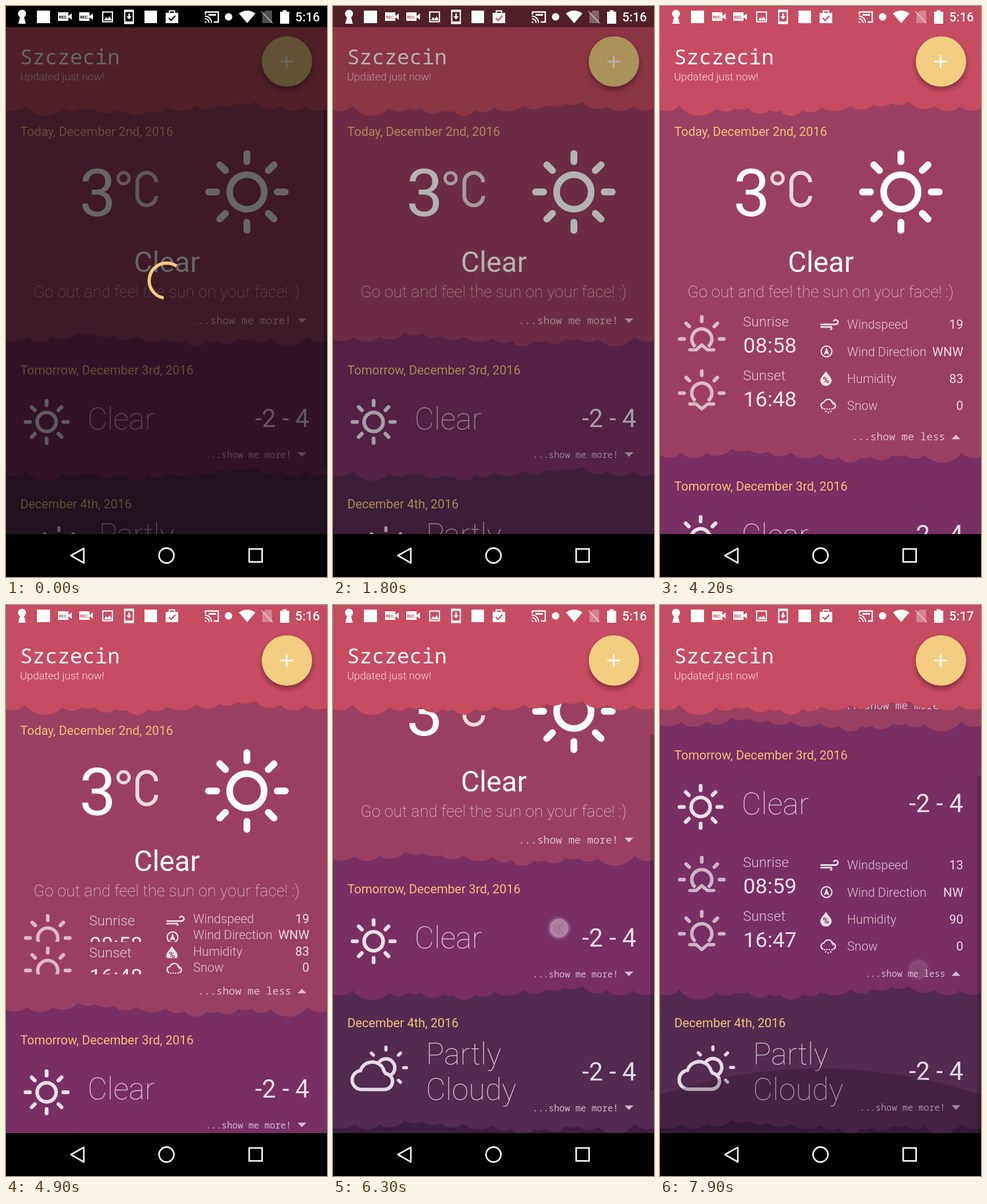
Recreate the animation shown at these times as an HTML page with a canvas. Size 561 by 998 pixels, loop 8000 ms.

```html
<!DOCTYPE html>
<html lang="en">
<head>
<meta charset="utf-8">
<title>Weather</title>
<style>
html, body { margin: 0; width: 100%; height: 100%; overflow: hidden; background: #000; }
canvas { display: block; width: 561px; height: 998px; }
</style>
</head>
<body>
<canvas id="c" width="561" height="998"></canvas>
<script>
const W = 561, H = 998, LOOP = 8000, BOTTOM = 923, TAU = Math.PI * 2;
const g = document.getElementById('c').getContext('2d');
const SANS = 'Roboto, sans-serif', MONO = '"Noto Sans Mono", monospace';
const HEADER = '#c64c62', GOLD = '#f0c07c';

const clamp = (v, a = 0, b = 1) => Math.min(b, Math.max(a, v));
const ramp = (t, a, b) => clamp((t - a) / (b - a));
const mix = (a, b, k) => a + (b - a) * k;
const sine = u => (1 - Math.cos(Math.PI * u)) / 2;
const out = u => 1 - (1 - u) ** 2;
const white = a => `rgba(255,255,255,${a})`;

// ---------- drawing helpers ----------
function text(s, x, y, size, color, weight = 400, align = 'left', font = SANS) {
  g.font = `${weight} ${size}px ${font}`;
  g.fillStyle = color;
  g.textAlign = align;
  g.fillText(s, x, y);
}
function line(color, width, pts, close) {
  g.beginPath();
  pts.forEach(([x, y]) => g.lineTo(x, y));
  if (close) g.closePath();
  g.strokeStyle = color;
  g.lineWidth = width;
  g.stroke();
}
function poly(color, pts) {
  g.beginPath();
  pts.forEach(([x, y]) => g.lineTo(x, y));
  g.fillStyle = color;
  g.fill();
}
function disc(x, y, r, color) {
  g.beginPath();
  g.arc(x, y, r, 0, TAU);
  g.fillStyle = color;
  g.fill();
}
function ring(x, y, r, width, color, a = 0, b = TAU) {
  g.beginPath();
  g.arc(x, y, r, a, b);
  g.lineWidth = width;
  g.strokeStyle = color;
  g.stroke();
}
function box(x, y, w, h, color) {
  g.fillStyle = color;
  g.fillRect(x, y, w, h);
}
function clipped(x, y, w, h, draw) {
  g.save();
  g.beginPath();
  g.rect(x, y, w, h);
  g.clip();
  draw();
  g.restore();
}
function rays(x, y, from, to, width, color, list) {
  g.lineCap = 'round';
  for (const k of list) {
    const c = Math.cos(k * TAU / 8), s = Math.sin(k * TAU / 8);
    line(color, width, [[x + c * from, y + s * from], [x + c * to, y + s * to]]);
  }
  g.lineCap = 'butt';
}

// bumps along a panel's lower edge: x, depth, radius
const BUMPS = [[12, 17, 30], [68, 25, 42], [115, 18, 26], [143, 14, 27], [175, 21, 27],
  [202, 18, 20], [229, 25, 24], [262, 19, 26], [305, 17, 46], [352, 14, 30],
  [386, 9, 32], [418, 6, 32], [462, 13, 34], [502, 17, 32], [546, 16, 36]];

function panel(base, color, flip) {
  if (base > 0) box(0, 0, W, base, color);
  for (const [x, d, r] of BUMPS) disc(flip ? W - x : x, base + d - r, r, color);
}

// ---------- weather icons ----------
function sun(x, y, k, color) {
  ring(x, y, 30.2 * k, 11.5 * k, color);
  rays(x, y, 53 * k, 67 * k, 12 * k, color, [0, 1, 2, 3, 4, 5, 6, 7]);
}
function horizonSun(x, y, dir) {
  const c = white(.64), b = y + 19;
  ring(x, y, 17.5, 6, c, Math.PI * .72, Math.PI * 2.28);
  rays(x, y, 31, 38.5, 6.4, c, [4, 5, 6, 7, 8]);
  g.lineCap = g.lineJoin = 'round';
  line(c, 5.6, [[x - 21, b], [x - 10, b], [x, b + 8.5 * dir], [x + 10, b], [x + 21, b]]);
  g.lineCap = 'butt';
  g.lineJoin = 'miter';
}
function cloudySun(y, fill) {
  const c = '#e6dbe4';
  ring(92.5, y + 78, 15.5, 6, c);
  rays(92.5, y + 78, 31, 36, 5.6, c, [0, 1, 5, 6, 7]);
  g.beginPath();
  g.arc(50, y + 99.5, 16.5, Math.PI * .5, Math.PI * 1.46);
  g.arc(68.5, y + 89.5, 21.5, Math.PI * 1.12, Math.PI * 1.92);
  g.arc(90, y + 102, 14, Math.PI * 1.55, Math.PI * 2.5);
  g.closePath();
  g.fillStyle = fill;
  g.fill();
  g.strokeStyle = c;
  g.lineWidth = 6;
  g.stroke();
}
const rowIcons = [
  y => {
    const c = white(.85);
    g.lineCap = 'round';
    line(c, 2.8, [[281.5, y], [306, y]]);
    ring(307, y - 4, 4, 2.6, c, -Math.PI * .8, Math.PI * .5);
    line(c, 2.8, [[281.5, y + 4.5], [298, y + 4.5]]);
    ring(298, y + 6.5, 2.2, 2.4, c, -Math.PI * .5, Math.PI * .5);
    g.lineCap = 'butt';
  },
  y => {
    ring(291, y, 9.4, 2.2, white(.85));
    poly(white(.85), [[291, y - 7], [296, y + 6], [291, y + 3.5], [286, y + 6]]);
  },
  (y, fill) => {
    g.beginPath();
    g.moveTo(290, y - 13);
    g.bezierCurveTo(293, y - 7, 300, y - 2, 300, y + 4);
    g.arc(290, y + 3, 10, .1, Math.PI - .1);
    g.bezierCurveTo(280, y - 2, 287, y - 7, 290, y - 13);
    g.fillStyle = white(.85);
    g.fill();
    text('%', 290, y + 8, 15, fill, 700, 'center');
  },
  y => {
    const c = white(.85);
    g.beginPath();
    g.arc(287, y, 5.5, Math.PI * .6, Math.PI * 1.5);
    g.arc(294, y - 3, 8, Math.PI * 1.1, Math.PI * 1.95);
    g.arc(301, y, 5.5, Math.PI * 1.5, Math.PI * 2.4);
    g.strokeStyle = c;
    g.lineWidth = 2.4;
    g.stroke();
    for (let i = 0; i < 7; i++) disc(287.5 + i * 2.2, y + 6 + (i % 2) * 4 + (i === 3 ? 2 : 0), 1.3, c);
  }
];

// ---------- day panels ----------
const ROW = 47.3;
const names = ['Windspeed', 'Wind Direction', 'Humidity', 'Snow'];

function details(top, p, day) {
  // rows shorter than their contents show them from the top
  const h = ROW * p, icon = (Math.max(h, 39) - ROW) / 2, label = (Math.max(h, 30) - ROW) / 2;
  ['Sunrise', 'Sunset'].forEach((name, i) => {
    const y = top + i * 2 * h;
    clipped(0, y, 275, 2 * h, () => {
      horizonSun(73, y + 50, i ? 1 : -1);
      text(name, 145, y + 27.6, 24.5, white(.72), 300);
      text(day.sun[i], 145.6, y + 73.7, 37.4, white(.86));
    });
  });
  names.forEach((name, i) => {
    const y = top + i * h;
    clipped(275, y, 286, h, () => {
      rowIcons[i](y + 24.5 + icon, day.color);
      text(name, 327, y + 32.4 + label, 21.8, white(.72), 300);
      text(day.data[i], 530, y + 32.4 + label, 21.8, white(.82), 400, 'right');
    });
  });
}
function more(y, open, size) {
  text(open ? '...show me less' : '...show me more!', 498.5, y + 6, size, white(.68), 400, 'right', MONO);
  const d = open ? -4 : 4;
  poly(white(.68), [[509.5, y - d], [525, y - d], [517.2, y + d]]);
}
function todayBody(y) {
  text('3', 128, y + 148, 115, '#fff');
  ring(205.5, y + 82, 9.8, 5.4, white(.8));
  g.beginPath();
  g.arc(246, y + 89, 16.5, 0, Math.PI, true);
  g.arc(246, y + 113, 16.5, Math.PI, 0, true);
  g.strokeStyle = white(.8);
  g.lineWidth = 6.6;
  g.stroke();
  sun(421, y + 106, 1, '#fff');
  text('Clear', 281, y + 246, 49.9, '#fff', 400, 'center');
  text('Go out and feel the sun on your face! :)', 280.5, y + 290, 28.3, white(.78), 100, 'center');
}
function range(y) {
  text('-2 - 4', 530, y + 100, 43.6, white(.85), 400, 'right');
}
const days = [
  { title: 'Today, December 2nd, 2016', color: '#9b3f62', base: 351, moreY: 331, size: 18.2,
    top: 313, extra: 14, curve: .45, sun: ['08:58', '16:48'], data: ['19', 'WNW', '83', '0'],
    next: 417, body: todayBody },
  { title: 'Tomorrow, December 3rd, 2016', color: '#782f61', base: 169, moreY: 148, size: 15.6,
    top: 168, extra: 45, curve: .62, sun: ['08:59', '16:47'], data: ['13', 'NW', '90', '0'],
    next: 234, body: y => {
      sun(71, y + 91, .55, white(.85));
      text('Clear', 142.5, y + 103.6, 53, white(.76), 100);
      range(y);
    } },
  { title: 'December 4th, 2016', color: '#552a4f', base: 169, moreY: 148, size: 15.6,
    next: 234, body: y => {
      cloudySun(y, '#552a4f');
      text('Partly', 162.5, y + 72.4, 53, white(.74), 100);
      text('Cloudy', 162.5, y + 134.5, 53, white(.74), 100);
      range(y);
    } }
];

function content(scroll, opens) {
  let y = 219 - scroll;
  const spots = days.map((day, i) => {
    const p = opens[i];
    const grow = p ? 4 * ROW * p + day.extra * p ** day.curve : 0;
    const spot = { day, p, y, grow, i };
    y += day.next + grow;
    return spot;
  });
  box(0, 0, W, BOTTOM, '#3c1e3e');
  for (const { day, p, y, grow, i } of spots.reverse()) {
    panel(y + day.base + grow, day.color, i % 2 === 0);
    text(day.title, 25, y + 7.5, 21.8, GOLD);
    day.body(y);
    if (p) details(y + day.top, p, day);
    more(y + day.moreY + grow, p > 0, day.size);
  }
}

function header() {
  panel(167, HEADER, false);
  text('Szczecin', 24.5, 102, 36.4, '#fff', 400, 'left', MONO);
  text('Updated just now!', 24.5, 130, 18.7, white(.8), 300);
  g.save();
  g.shadowColor = 'rgba(60,10,30,.5)';
  g.shadowBlur = 10;
  g.shadowOffsetY = 5;
  disc(491, 97, 44, '#f3ce80');
  g.restore();
  box(479.5, 95.5, 22, 3, '#fff');
  box(489, 86, 3, 22, '#fff');
}

// ---------- system bars ----------
function statusBar(clock, bg) {
  const w = '#fff';
  disc(28, 13.5, 7, w);
  poly(w, [[25.5, 15], [30.5, 15], [34.5, 31], [21.5, 31]]);
  box(54, 8, 23, 22, w);
  for (const x of [91, 128]) {
    box(x, 11, 18, 15, w);
    poly(w, [[x + 16, 18.5], [x + 24, 13], [x + 24, 24]]);
    text('REC.', x + 9, 21.5, 7, bg, 700, 'center');
  }
  g.strokeStyle = w;
  g.lineWidth = 2.2;
  g.strokeRect(169, 10.5, 17, 17);
  poly(w, [[171, 25], [175, 19.5], [178, 22.5], [181, 18], [185, 25]]);
  g.strokeRect(207.5, 7.5, 15, 23);
  box(207, 7, 16, 3.5, w);
  box(207, 27, 16, 4, w);
  box(213.8, 13, 2.6, 6, w);
  poly(w, [[210.5, 18], [219.5, 18], [215, 23.5]]);
  box(242, 8, 22, 22, w);
  box(279, 12, 22, 18, w);
  g.strokeStyle = w;
  g.strokeRect(285.5, 8.5, 9, 5);
  line(bg, 2.4, [[284.5, 21], [288.5, 25], [296, 17]]);

  line(w, 2.4, [[348.5, 15], [348.5, 10.5], [371, 10.5], [371, 28], [363, 28]]);
  poly(w, [[347.5, 25.5], [351, 29.5], [347.5, 29.5]]);
  ring(347.5, 29.5, 7.5, 2.2, w, -Math.PI / 2, 0);
  ring(347.5, 29.5, 11.8, 2.2, w, -Math.PI / 2, 0);
  box(354, 14, 13, 3, w);
  disc(389, 19, 6.5, w);
  g.beginPath();
  g.moveTo(421.5, 30);
  g.lineTo(407, 13);
  g.quadraticCurveTo(421.5, 3, 436, 13);
  g.fillStyle = w;
  g.fill();
  poly(white(.3), [[454, 8], [465, 8], [465, 30], [448, 30], [448, 14]]);
  line(white(.45), 2.2, [[446, 9], [466, 30]]);
  box(479, 10, 16, 21, w);
  box(483.5, 7.5, 7, 3, w);
  text(clock, 548.5, 27, 21.8, w, 500, 'right');
}
function navBar() {
  const w = '#f4f4f4';
  box(0, BOTTOM, W, H - BOTTOM, '#000');
  g.lineJoin = 'round';
  line(w, 2.8, [[113.5, 960.5], [136, 948], [136, 973.5]], true);
  g.lineJoin = 'miter';
  ring(280.5, 960.5, 13, 2.8, w);
  g.strokeRect(425, 949, 22.6, 22.6);
}

// ---------- overlays ----------
const sweep = u => { const v = u ** .58; return v * v * (3 - 2 * v); };

function spinner(t, alpha) {
  const c = ((t + 313) % 1332) / 1332;
  const tail = .75 * sweep(ramp(c, .5, 1));
  const head = .75 * sweep(ramp(c, 0, .5)) + .03;
  const spin = .25 * (c - .235) + t / 2222 + .278;
  g.globalAlpha = alpha;
  ring(281, 480, 30.8, 5.6, '#f8cc7d', (tail + spin) * TAU, (head + spin) * TAU);
  g.globalAlpha = 1;
}
function touch(x, y, alpha) {
  if (alpha <= 0) return;
  const r = 22, f = g.createRadialGradient(x, y, 0, x, y, r);
  f.addColorStop(0, 'rgba(206,170,196,.85)');
  f.addColorStop(.55, 'rgba(214,184,206,.87)');
  f.addColorStop(.7, 'rgba(228,206,222,.85)');
  f.addColorStop(.77, white(.28));
  f.addColorStop(1, white(0));
  g.globalAlpha = alpha;
  disc(x, y, r, f);
  g.globalAlpha = 1;
}
const press = (t, a, b) => t < a ? 0 : 1 - ramp(t, b, b + 145);

function draw(t) {
  const drag = out(ramp(t, 5810, 6340)), fling = sine(ramp(t, 7450, 7830));
  const scroll = 140 * drag + 234 * fling;
  const today = sine(ramp(t, 2865, 3400)) * (1 - sine(ramp(t, 4670, 5200)));
  const tomorrow = sine(ramp(t, 6897, 7430));

  g.clearRect(0, 0, W, H);
  content(scroll, [today, tomorrow, 0]);

  // pulled past the end of the list
  const pull = out(ramp(t, 7720, 7900));
  if (pull) {
    const edge = mix(BOTTOM, 856, pull);
    g.beginPath();
    g.moveTo(0, edge);
    g.quadraticCurveTo(280, mix(BOTTOM, 764, pull), W, edge);
    g.lineTo(W, BOTTOM);
    g.lineTo(0, BOTTOM);
    g.fillStyle = `rgba(20,12,22,${.24 * pull})`;
    g.fill();
  }

  const bar = t < 4000 ? 1 - ramp(t, 1000, 1300)
    : ramp(t, 5800, 5900) * (1 - ramp(t, 6600, 6900)) + ramp(t, 7450, 7550);
  box(555, 183 + scroll * .313, 6, 621, `rgba(20,8,24,${.28 * bar})`);

  header();

  const dim = 1 - ramp(t, 1600, 2000);
  box(0, 37, W, BOTTOM - 37, `rgba(0,0,0,${.6 * dim})`);
  box(0, 0, W, 37, `rgba(0,0,0,${dim ** .75})`);
  statusBar(t < 6600 ? '5:16' : '5:17', dim > .7 ? '#000' : HEADER);
  if (t < 1820) spinner(t, 1 - .96 * ramp(t, 1600, 1800));

  touch(440, 552, press(t, 2790, 2845));
  touch(440, 752, press(t, 4590, 4660));
  touch(395, 704 - 140 * drag, press(t, 5790, 6250));
  touch(440, 642, press(t, 6620, 6850));
  touch(452, mix(890, 637, fling), press(t, 7450, 7785));

  navBar();
}

function tick(now) {
  draw(now % LOOP);
  requestAnimationFrame(tick);
}
draw(0);
requestAnimationFrame(tick);
</script>
</body>
</html>
```
